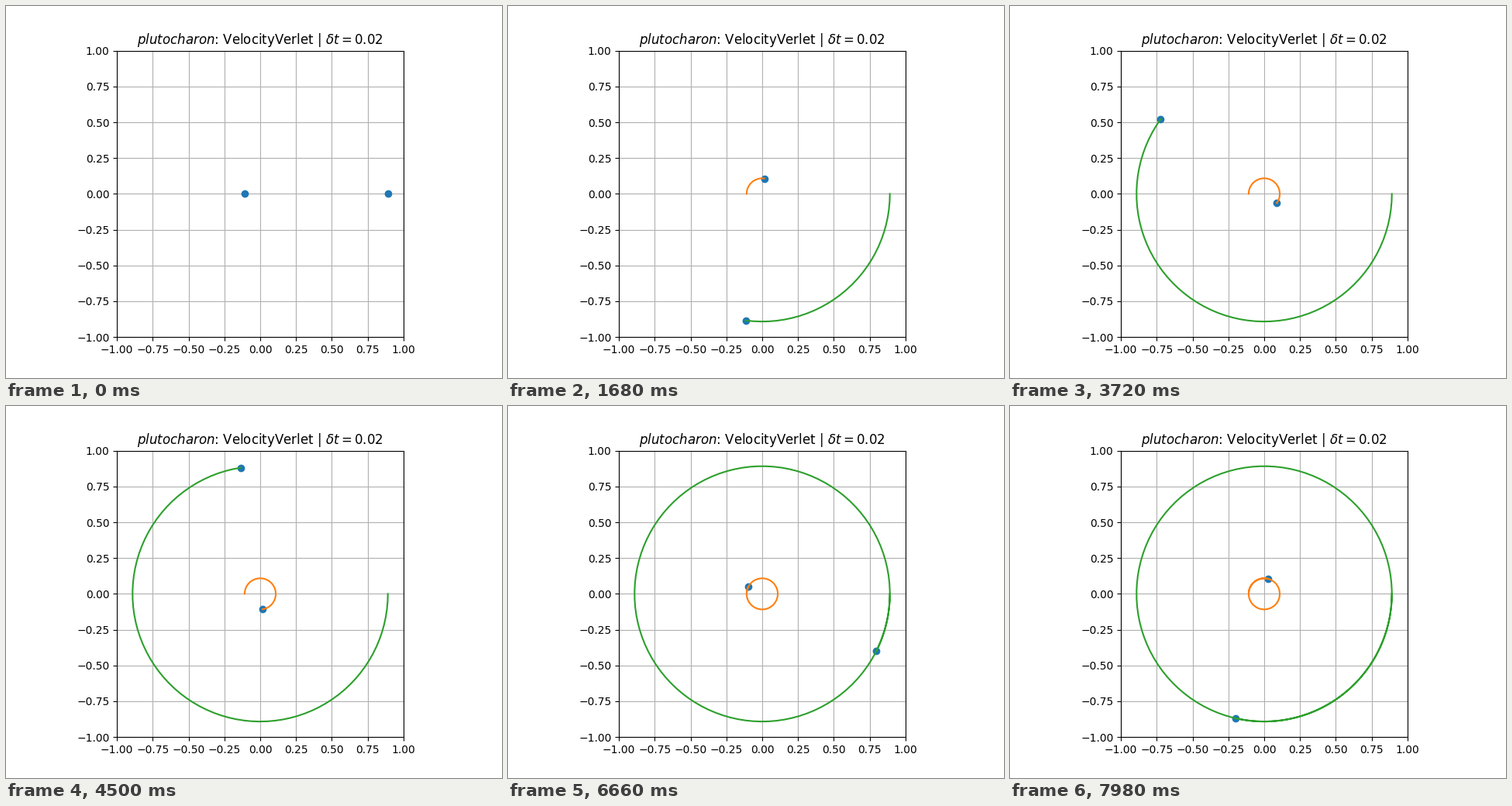
Write a matplotlib script that moves like this. It is 640 px wide and 480 px high and loops after 8 s.

```python
import numpy as np
import matplotlib.pyplot as plt
from matplotlib.animation import FuncAnimation

LOOP_MS = 8000
TICK_MS = 20
STEP_MS = 60
MASS_RATIO = 0.1218          # moon mass / planet mass
TURN = np.radians(3.4815)    # clockwise angle per step

r_moon = 1 / (1 + MASS_RATIO)
r_planet = 1 - r_moon

angle = -TURN * np.arange(LOOP_MS // STEP_MS + 1)
unit = np.column_stack([np.cos(angle), np.sin(angle)])
planet = -r_planet * unit
moon = r_moon * unit

fig, ax = plt.subplots(figsize=(6.4, 4.8), dpi=100)
ax.set_aspect("equal")
ax.set_xlim(-1, 1)
ax.set_ylim(-1, 1)
ax.set_xticks(np.linspace(-1, 1, 9))
ax.set_yticks(np.linspace(-1, 1, 9))
ax.grid(True)
ax.set_title(r"$plutocharon$: VelocityVerlet | $\delta t = 0.02$")

bodies, = ax.plot([], [], "o", color="C0")
planet_trail, = ax.plot([], [], color="C1")
moon_trail, = ax.plot([], [], color="C2")


def update(i):
    step = i * TICK_MS // STEP_MS
    bodies.set_data(*np.array([planet[step], moon[step]]).T)
    planet_trail.set_data(*planet[:step + 1].T)
    moon_trail.set_data(*moon[:step + 1].T)
    return bodies, planet_trail, moon_trail


anim = FuncAnimation(fig, update, frames=LOOP_MS // TICK_MS,
                     interval=TICK_MS, repeat=True, repeat_delay=0)
plt.show()
```
